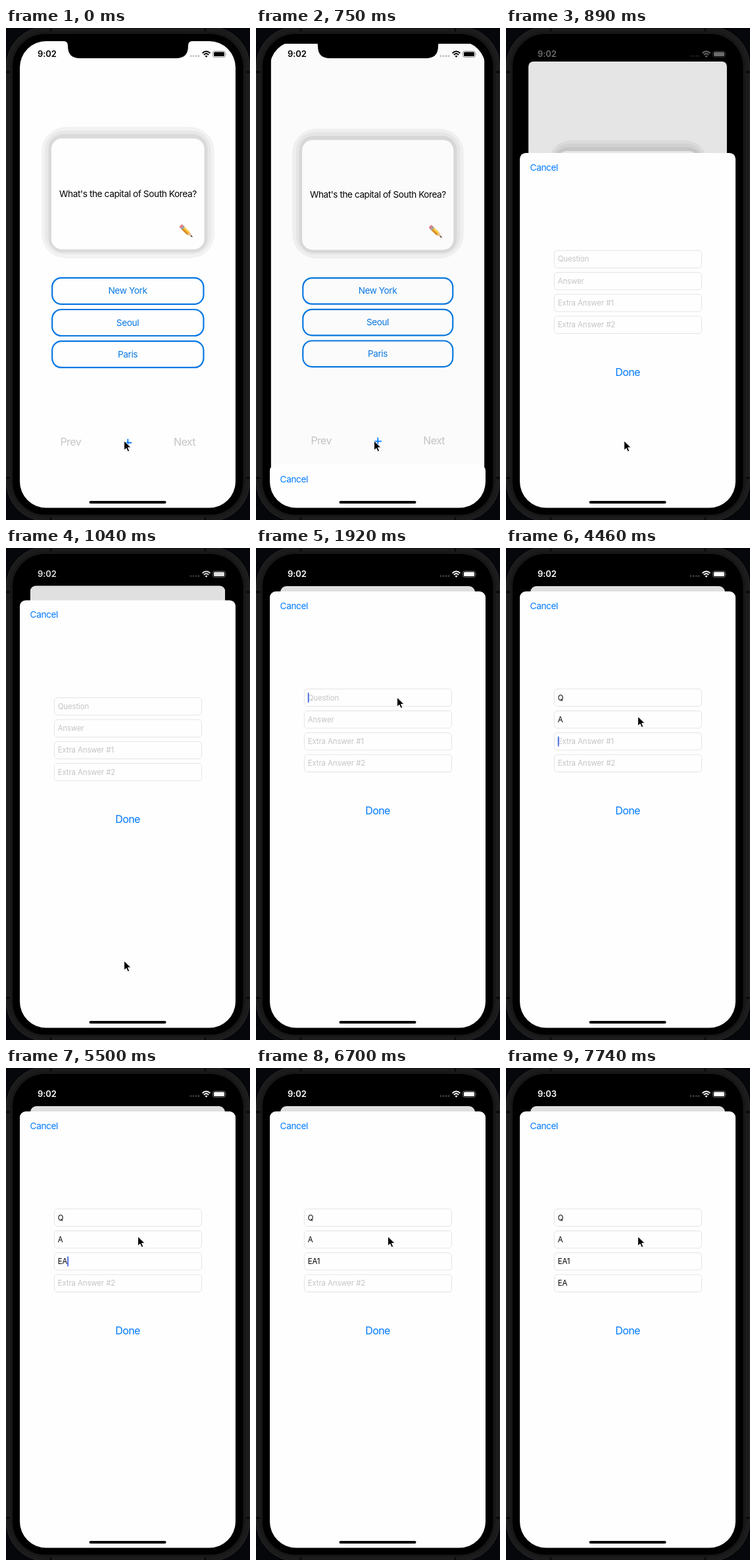
Recreate the animation shown at these times as an HTML page. Size 371x748 px, loop 8 s.

```html
<!DOCTYPE html>
<html lang="en">
<head>
<meta charset="utf-8">
<title>Quiz cards</title>
<style>
html, body { margin: 0; width: 100%; height: 100%; overflow: hidden; background: #05070b; }
svg { display: block; width: 371px; height: 748px; }
text { font-family: Inter, "Open Sans", sans-serif; font-size: 13.7px; letter-spacing: -.42px; }
.mid { text-anchor: middle; }
.big { font-size: 16px; letter-spacing: -.6px; }
.field { font-size: 11.4px; letter-spacing: -.1px; }
.link { fill: #007aff; }
.choice { fill: #0878e2; }
.off { fill: #c5c5c7; }
.clock { font-size: 13px; font-weight: 600; letter-spacing: -.1px; }
</style>
</head>
<body>
<svg viewBox="0 0 371 748">
  <defs>
    <clipPath id="screen"><rect x="21" y="20" width="328" height="709.5" rx="40"/></clipPath>
    <clipPath id="page"><rect id="pageShape" x="21" y="20" width="328" height="709.5"/></clipPath>
  </defs>

  <!-- phone body -->
  <rect x=".5" y="-1.5" width="370" height="751" rx="60" fill="#1b1b1c" stroke="#29292b"/>
  <rect x="5.5" y="4" width="360" height="740.5" rx="55" fill="#171718" stroke="#202021"/>
  <path d="M0 67H6M365 67H371M0 684H6M365 684H371M68 0V5M303 0V5M68 744V748M303 744V748" stroke="#0a0a0b" stroke-width="3"/>
  <rect x="10" y="9" width="350.5" height="731" rx="50"/>

  <g clip-path="url(#screen)">
    <g id="back" clip-path="url(#page)">
      <rect x="21" y="20" width="328" height="710" fill="#fefefe"/>
      <rect x="54" y="150.5" width="263" height="199.5" rx="37" fill="#f2f2f2"/>
      <rect x="59.5" y="156" width="252" height="188" rx="29" fill="#e8e8e8"/>
      <rect x="64.5" y="161.5" width="242" height="179.5" rx="22" fill="#dadada"/>
      <rect x="69" y="168" width="232.5" height="168.5" rx="16" fill="#fefefe"/>
      <text class="mid" x="185.4" y="257">What's the capital of South Korea?</text>
      <g transform="translate(265.5 300.5) rotate(44)">
        <path d="M2-3H17V3H2Z" fill="#f2b02c"/>
        <path d="M5-3H17V-1H5Z" fill="#ffd765"/>
        <path d="M5 1H17V3H5Z" fill="#cf8320"/>
        <rect x="-.5" y="-3" width="4.5" height="6" rx="1.6" fill="#e2818c"/>
        <path d="M3-3H6V3H3Z" fill="#9aa4ad"/>
        <path d="M17-3L25 0L17 3Z" fill="#e8c39a"/>
        <path d="M22-1.2L25.6 0L22 1.2Z" fill="#333"/>
      </g>
      <g id="choices" fill="none" stroke="#0878e2" stroke-width="2.2"></g>
      <text class="big off" x="82.5" y="635">Prev</text>
      <text class="big off" x="255" y="635">Next</text>
      <path d="M179.5 630.5H191M185.3 624.8V636.2" stroke="#007aff" stroke-width="1.8"/>
    </g>
    <rect id="dim" x="21" y="20" width="328" height="710"/>
    <g id="sheet">
      <rect x="21" width="328" height="740" rx="9" fill="#fefefe"/>
      <text class="link" x="36.6" y="27">Cancel</text>
      <g id="fields"></g>
      <text class="big link mid" x="185" y="339">Done</text>
      <rect id="caret" width="1.7" height="15" fill="#3c62e6"/>
    </g>
    <path d="M88 19V20Q94 20 94 27C94 40 100 46 113 46H258C271 46 277 40 277 27Q277 20 283 20V19Z"/>
  </g>

  <g id="status">
    <text id="clock" class="clock" x="48" y="44.3">9:02</text>
    <g opacity=".25">
      <circle cx="281" cy="42.7" r="1.4"/><circle cx="285.2" cy="42.7" r="1.4"/>
      <circle cx="289.3" cy="42.7" r="1.4"/><circle cx="293" cy="42.7" r="1.4"/>
    </g>
    <g fill="none" stroke="currentColor" stroke-width="1.9">
      <path d="M298.6 38.3Q304.5 32.8 310.4 38.3M300.8 40.8Q304.5 37.3 308.2 40.8"/>
    </g>
    <path d="M302.5 42.7Q304.5 41 306.5 42.7L304.5 44.8Z"/>
    <rect x="314.5" y="35.2" width="19" height="9.3" rx="2.8" fill="none" stroke="currentColor" stroke-opacity=".45" stroke-width=".9"/>
    <rect x="316" y="36.6" width="16" height="6.5" rx="1.5"/>
    <path d="M334.7 38.4Q336.2 39.8 334.7 41.3Z" opacity=".5"/>
  </g>
  <rect x="126.5" y="719" width="117" height="4" rx="2"/>
  <path id="mouse" d="M0 0V14.6L3.4 11.4L5.7 16.6L8.2 15.5L6 10.4H10.6Z" stroke="#fff" stroke-width="1" stroke-linejoin="round"/>
</svg>

<script>
const $ = id => document.getElementById(id);
const LOOP = 8000, SHEET_TOP = 66, START = 721;
const hints = ['Question', 'Answer', 'Extra Answer #1', 'Extra Answer #2'];

// [time, field, text]
const typing = [[2520, 0, 'Q'], [4160, 1, 'A'], [5050, 2, 'E'], [5500, 2, 'EA'],
  [5800, 2, 'EA1'], [6850, 3, 'E'], [7290, 3, 'EA']];
// [time, field, opacity]
const blinks = [[0, 0, 0], [1920, 0, 1], [2370, 0, 0], [2520, 0, 1], [2970, 0, 0],
  [3260, 1, 1], [3710, 1, .5], [3860, 1, 0], [4010, 1, .5], [4160, 1, 1], [4460, 2, 1],
  [4900, 2, 0], [5050, 2, 1], [6250, 3, 1], [6700, 3, 0], [6850, 3, 1], [7740, 3, 0]];
// [time, x, y]
const moves = [[0, 179.5, 627.5], [1340, 187, 540], [1490, 208, 310], [1630, 214.5, 227],
  [3110, 200.5, 256]];
const ticks = [0, 750, 890, 1040, 1190, 1340, 1490, 1630];

const rowY = i => 148.3 + i * 33.25;
const latest = (list, t) => list.filter(e => e[0] <= t).pop();
const clamp = v => Math.max(0, Math.min(1, v));

$('choices').innerHTML = ['New York', 'Seoul', 'Paris'].map((name, i) => `
  <rect x="70.2" y="${379.8 + i * 48.2}" width="230.2" height="40" rx="14"/>
  <text class="mid choice" stroke="none" x="185" y="${404.3 + i * 48.2}">${name}</text>`).join('');
$('fields').innerHTML = hints.map((_, i) => `
  <rect x="73.4" y="${rowY(i)}" width="224.2" height="26.4" rx="4.5" fill="#fefefe" stroke="#dedede" stroke-width=".8"/>
  <text class="field" x="78.7" y="${rowY(i) + 17.2}"></text>`).join('');
const inputs = [...$('fields').querySelectorAll('text')];

// critically damped spring, 0 to 1
function spring(ms) {
  const x = Math.max(0, ms) * .01826;
  return 1 - (1 + x) * Math.exp(-x);
}

function draw(t) {
  const held = ticks.filter(s => s <= t).pop();
  const p = held ? spring(held - START) : 0;
  const scale = 1 - .098 * p;
  $('back').setAttribute('transform',
    `translate(${185 * (1 - scale)} ${20 + 38 * p - 20 * scale}) scale(${scale})`);
  $('pageShape').setAttribute('rx', 10 * p);
  $('dim').setAttribute('opacity', .12 * p);
  $('screen').parentNode.parentNode.style.setProperty('--p', p);
  $('sheet').setAttribute('transform', `translate(0 ${SHEET_TOP + 664 * (1 - p)})`);

  const level = Math.round(255 * clamp((held - 750) / 330));
  const tone = `rgb(${level},${level},${level})`;
  $('status').setAttribute('fill', tone);
  $('status').setAttribute('color', tone);
  $('clock').textContent = t < 7150 ? '9:02' : '9:03';

  inputs.forEach((el, i) => {
    const entry = latest(typing.filter(e => e[1] === i), t);
    el.textContent = entry ? entry[2] : hints[i];
    el.setAttribute('fill', entry ? '#000' : '#c4c4c6');
  });

  const [, row, alpha] = latest(blinks, t);
  const filled = typing.some(e => e[1] === row && e[0] <= t);
  $('caret').setAttribute('x', 78.8 + (filled ? inputs[row].getComputedTextLength() : 0));
  $('caret').setAttribute('y', rowY(row) + 5.8);
  $('caret').setAttribute('opacity', alpha);

  const [, x, y] = latest(moves, t);
  $('mouse').setAttribute('transform', `translate(${x} ${y})`);
}

function loop() {
  draw(performance.now() % LOOP);
  requestAnimationFrame(loop);
}
loop();
</script>
</body>
</html>
```
